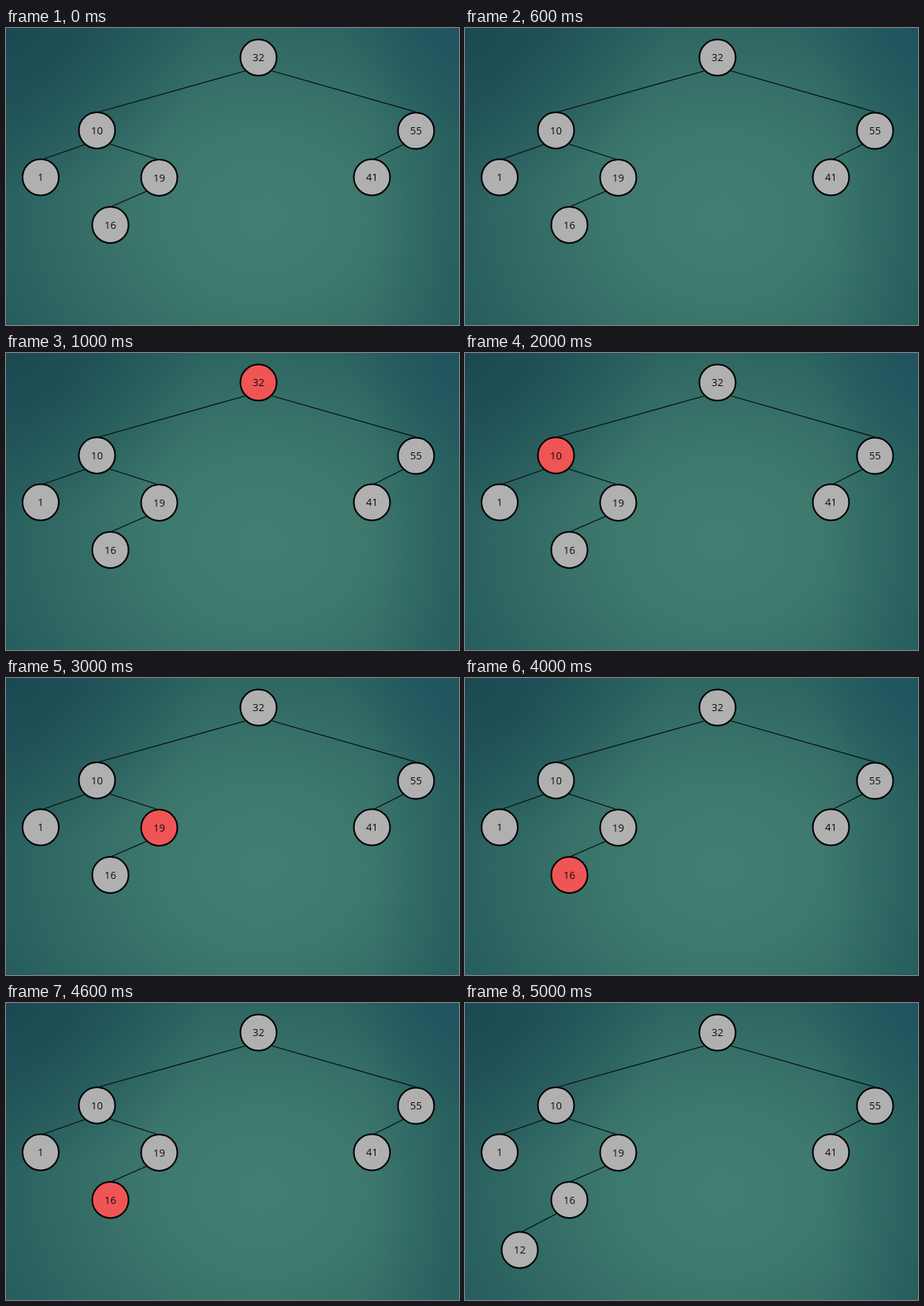
An HTML page for the animation above (6 s loop, 575 by 377 pixels).

```html
<!DOCTYPE html>
<html lang="en">
<head>
<meta charset="utf-8">
<title>Binary search tree insertion</title>
<style>
  html, body { margin: 0; width: 100%; height: 100%; overflow: hidden; }
  body {
    background:
      radial-gradient(ellipse 260px 220px at 0 0, rgba(22, 66, 78, .75), rgba(22, 66, 78, 0)),
      radial-gradient(ellipse 150px 150px at 100% 0, rgba(30, 80, 96, .6), rgba(30, 80, 96, 0)),
      linear-gradient(to left, rgba(30, 84, 90, .45), rgba(30, 84, 90, 0) 110px),
      radial-gradient(ellipse 355px 300px at 325px 240px,
        #427e71 0, #3e796e 35%, #316a64 72%, #275d5f 100%);
  }
  svg { display: block; width: 575px; height: 377px; }
  line { stroke: #060c0b; stroke-width: 1.2; }
  circle { fill: #b0b0b0; stroke: #000; stroke-width: 2; }
  text { font: 13px "Open Sans", sans-serif; text-anchor: middle; fill: #0c0c0c; }

  .visit { animation: visit 6s step-end var(--at) infinite; }
  .inserted { visibility: hidden; animation: appear 6s step-end 5s infinite; }
  @keyframes visit {
    0% { fill: #f05555; }
    16.6667%, 100% { fill: #b0b0b0; }
  }
  @keyframes appear {
    0% { visibility: visible; }
    16.6667%, 100% { visibility: hidden; }
  }
</style>
</head>
<body>
<svg viewBox="0 0 575 377">
  <line x1="304" y1="54.5" x2="118" y2="106.5"/>
  <line x1="336" y1="54" x2="520" y2="106.5"/>
  <line x1="100" y1="148" x2="47" y2="166.5"/>
  <line x1="131" y1="147" x2="193" y2="167"/>
  <line x1="179" y1="207" x2="133" y2="227"/>
  <line x1="504" y1="148" x2="467" y2="166.5"/>

  <g transform="translate(320.5 37.5)">
    <circle r="23" class="visit" style="--at: 1s"/><text y="4.5">32</text>
  </g>
  <g transform="translate(115.5 130)">
    <circle r="23" class="visit" style="--at: 2s"/><text y="5">10</text>
  </g>
  <g transform="translate(194.5 190)">
    <circle r="23" class="visit" style="--at: 3s"/><text y="4.5">19</text>
  </g>
  <g transform="translate(132.5 250)">
    <circle r="23" class="visit" style="--at: 4s"/><text y="5">16</text>
  </g>
  <g transform="translate(44 189.5)"><circle r="23"/><text y="4.5">1</text></g>
  <g transform="translate(520.5 130.5)"><circle r="23"/><text y="4.5">55</text></g>
  <g transform="translate(464.5 189.5)"><circle r="23"/><text y="4.5">41</text></g>

  <g class="inserted">
    <line x1="116" y1="267.5" x2="72" y2="290.5"/>
    <g transform="translate(69.5 313.5)"><circle r="23"/><text y="4.5">12</text></g>
  </g>
</svg>
</body>
</html>
```
